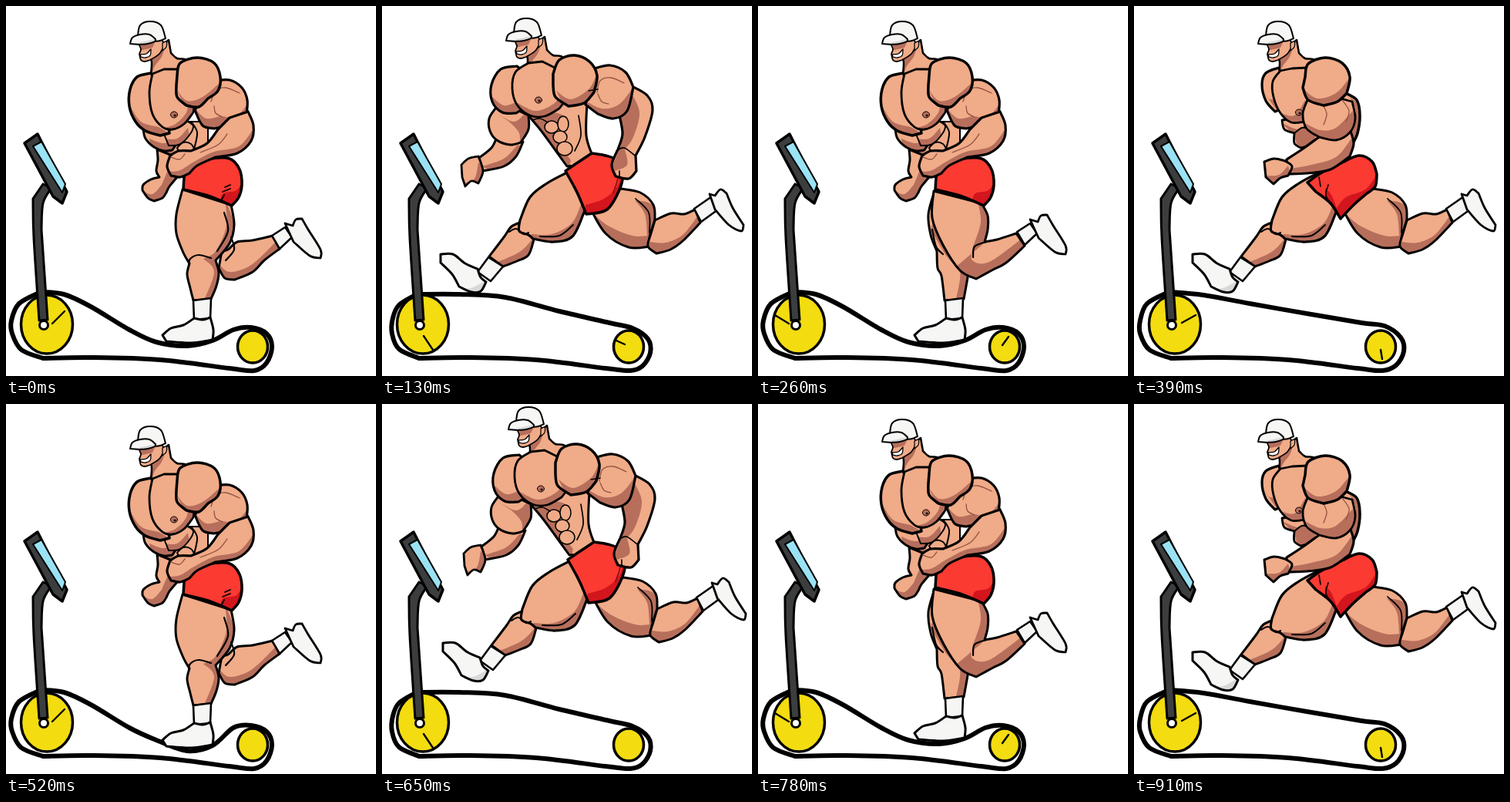
An HTML page with a canvas that plays this animation: 480 by 480 pixels, repeating every 1.04 s.

```html
<!DOCTYPE html>
<html lang="en">
<head>
<meta charset="utf-8">
<title>Treadmill runner</title>
<style>
html, body { margin: 0; width: 100%; height: 100%; overflow: hidden; background: #fff; }
canvas { display: block; }
</style>
</head>
<body>
<canvas id="stage" width="480" height="480"></canvas>
<script>
const ctx = document.getElementById('stage').getContext('2d');
const INK = '#000', SKIN = '#f0ab88', SHADE = '#b76f5c', RED = '#fb3a32', DEEP = '#d3151d',
      WHITE = '#f6f6f5', YELLOW = '#f3dc10', STEEL = '#3c3d3e', BLUE = '#9ae2f4';
const STEP = 130;
ctx.lineCap = ctx.lineJoin = 'round';

// Smooth curve through points; "/" marks a corner, ";" starts a new stroke.
const cache = new Map();
function curve(text) {
  if (cache.has(text)) return cache.get(text);
  const path = new Path2D();
  for (const stroke of text.split(';')) {
    let last = null;
    for (const run of stroke.split('/')) {
      const n = run.trim().split(/\s+/).map(Number);
      const p = last ? [last] : [];
      for (let i = 0; i < n.length; i += 2) p.push([n[i], n[i + 1]]);
      if (!last) path.moveTo(...p[0]);
      for (let i = 0; i < p.length - 1; i++) {
        const a = p[i - 1] || p[i], b = p[i], c = p[i + 1], d = p[i + 2] || c;
        path.bezierCurveTo(b[0] + (c[0] - a[0]) / 6, b[1] + (c[1] - a[1]) / 6,
                           c[0] - (d[0] - b[0]) / 6, c[1] - (d[1] - b[1]) / 6, ...c);
      }
      last = p[p.length - 1];
    }
  }
  cache.set(text, path);
  return path;
}

function line(text, width = 2, color = INK) {
  ctx.strokeStyle = color;
  ctx.lineWidth = width;
  ctx.stroke(curve(text));
}

// Filled, outlined shape with an optional shadow kept inside it.
function part(text, fill, shadow, width = 3) {
  const path = curve(text + ' / ' + text.trim().split(/\s+/).slice(0, 2).join(' '));
  ctx.fillStyle = fill;
  ctx.fill(path);
  if (shadow) {
    ctx.save();
    ctx.clip(path);
    ctx.fillStyle = fill === RED ? DEEP : fill === WHITE ? '#d9d9d9' : SHADE;
    ctx.fill(curve(shadow));
    ctx.restore();
  }
  ctx.strokeStyle = INK;
  ctx.lineWidth = width;
  if (width) ctx.stroke(path);
}

function oval(x, y, rx, ry, fill, width = 2) {
  ctx.beginPath();
  ctx.ellipse(x, y, rx, ry, 0, 0, 7);
  ctx.fillStyle = fill;
  ctx.fill();
  ctx.strokeStyle = INK;
  ctx.lineWidth = width;
  ctx.stroke();
}

function nipple(x, y) {
  oval(x, y, 4.5, 4, SHADE, 1);
  oval(x + 1, y + 1, 1.2, 1, '#7d3f35', 1);
}

function head() {
  part('187 62 / 189 74 188 88 / 205 110 240 95 / 235 71 222 68 214 61 / 211 44', SKIN,
       '185 68 / 190 88 / 193 78 202 66 206 54', 2.5);
  part('172 49 / 175 56 173 62 / 175 70 180 72 187 70 / 199 62 206 50 / 200 40', SKIN,
       '168 48 / 173 57 190 54 / 195 44', 1.8);
  part('174 63 / 182 62 188 56 / 187 64 181 67 175 66', '#fff', '', 1.3);
  part('203 48 / 208 46 208 53 203 58', SKIN, '', 1.2);
  part('171 39 / 174 25 187 20 201 25 207 42 / 200 45 192 46', WHITE, '', 2);
  part('161 49 / 164 41 174 37 186 37 194 43 / 193 46 184 49 173 50', WHITE,
       '161 50 175 47 193 43 / 193 52', 2);
}

function standTorso(marks) {
  part('200 150 / 206 185 222 212 / 232 225 / 262 208 / 262 150', SKIN, '200 150 / 212 180 228 224 / 195 220', 2);
  part('196 186 / 197 200 195 214 199 222 / 188 225 178 232 177 239 / 184 249 192 253 / 203 249 208 242 / 212 234 222 222 / 218 195',
       SKIN, '177 240 / 190 244 202 232 / 214 206 225 200 / 222 258 184 258');
  part('236 210 / 262 199 290 198 303 212 306 232 302 248 293 259 / 262 246 230 238 / 231 222', RED,
       '307 226 / 299 239 282 243 278 252 / 293 263 307 250', 3.5);
  if (marks) line('281 241 291 237; 284 235 291 232; 279 253 283 245', 1.8);
  part('178 160 / 181 172 192 183 205 188 216 187 / 226 165 200 155', SKIN, '186 172 / 204 178 222 172 / 222 195 190 195');
  part('205 166 / 216 159 232 148 / 243 156 236 170 224 180 211 181', SKIN, '205 172 / 222 172 236 158 / 238 190 205 188', 2);
  part('222 184 / 230 177 240 179 245 187 / 236 193 226 192', SKIN, '', 2);
  line('240 150 / 248 164 244 186', 2);
  part('188 87 / 170 92 161 108 160 130 168 150 181 162 200 168 / 212 165 / 205 120', SKIN,
       '160 128 / 175 150 198 157 / 215 170 165 168', 3.5);
  part('190 88 / 186 112 190 140 203 157 216 160 231 153 243 138 / 246 120 / 225 82 / 205 82', SKIN,
       '205 158 / 220 153 234 138 236 122 / 250 130 225 170', 2.8);
  nipple(218, 141);
  part('270 97 / 290 96 306 106 313 122 312 140 / 298 152 270 159 / 255 155 245 135', SKIN,
       '246 134 / 260 146 280 143 297 145 313 128 / 315 158 260 165', 3.2);
  line('266 124 / 272 110 285 106 303 113; 270 130 / 272 139 281 144', 1.3, '#925443');
  part('314 137 / 321 155 318 175 300 191 272 196 / 248 207 238 217 / 226 222 214 220 / 209 208 213 194 / 224 188 240 188 / 261 178 275 160 / 290 145',
       SKIN, '322 158 / 302 182 270 189 244 202 226 213 211 215 / 218 228 330 200', 3.2);
  line('214 196 / 225 199 232 192; 252 190 / 275 180 287 166', 1.3, '#925443');
  part('222 90 / 226 74 248 67 270 74 278 92 275 110 262 120 / 250 131 234 129 / 222 118 221 103', SKIN,
       '221 108 / 235 123 255 118 277 100 / 276 125 235 137', 3.5);
}

function standLegNear() {
  part('280 318 / 288 316 300 306 320 304 346 298 / 355 315 / 335 330 320 345 297 355 / 284 353 276 340', SKIN,
       '276 334 / 290 345 318 336 350 306 / 360 318 300 365 275 355');
  part('229 238 / 221 270 221 295 230 320 238 334 / 235 348 239 366 243 382 / 266 380 / 273 363 276 346 272 330 / 290 308 296 284 292 258', SKIN,
       '284 250 / 286 285 272 318 256 328 / 270 345 256 384 / 280 380 / 300 290');
  line('237 336 / 239 328 250 323 266 327; 283 268 / 288 292 274 318; 292 300 / 296 316 285 330', 2.2);
  sock('243 382 / 244 407 / 265 405 / 266 379');
  backFoot(0, 0);
}

function standLegFar() {
  part('229 240 / 221 270 224 297 232 318 / 233 340 238 350 242 382 / 267 380 / 272 352 275 330', SKIN,
       '224 290 / 245 325 262 345 256 384 / 285 380 285 320 230 270');
  part('228 240 / 226 275 240 310 262 343 283 354 / 305 342 322 333 346 311 / 335 295 / 310 303 294 306 / 298 290 298 272 290 256', SKIN,
       '284 250 / 289 280 279 312 / 278 330 300 332 342 302 / 352 318 285 368 255 340 / 276 322 / 297 302 302 275');
  line('279 326 / 281 312 296 306; 226 290 / 231 312 240 322', 2.2);
  sock('243 382 / 244 407 / 265 405 / 266 379');
  backFoot(-9, -5);
}

function sock(text) { part(text, WHITE, '', 2.6); }

function backFoot(dx, dy) {
  ctx.save();
  ctx.translate(dx, dy);
  sock('345 298 / 362 287 / 371 300 / 355 315');
  part('362 282 / 372 285 / 376 277 384 276 / 392 290 408 316 408 327 / 394 324 373 306', WHITE, '', 2.8);
  ctx.restore();
}

function stand(near) {
  (near ? standLegNear : standLegFar)();
  part('203 427 / 214 418 230 414 244 405 / 256 407 265 404 / 269 420 268 433 / 240 437 208 435', WHITE, '', 3);
  head();
  standTorso(near);
}

function leapLegs() {
  part('310 237 / 335 242 352 258 354 278 / 347 300 347 312 / 320 313 290 295 270 262 / 280 240', SKIN,
       '272 268 / 295 286 325 298 344 298 / 341 270 328 252 / 352 260 360 300 330 325 275 300');
  part('354 278 / 375 269 392 270 406 264 / 413 281 / 390 305 374 316 356 321 / 345 312 348 298', SKIN,
       '347 306 / 368 307 390 297 410 272 / 420 285 365 330 342 320');
  line('329 250 / 346 268 347 294', 1.8);
  sock('405 263 / 428 247 / 436 264 / 414 280');
  part('425 244 / 432 246 / 439 238 447 243 / 455 262 469 284 / 466 292 450 284 432 264', WHITE, '', 2.8);

  part('182 280 / 168 286 158 300 139 325 / 157 338 / 175 331 190 323 197 303 / 194 290', SKIN,
       '200 296 / 180 318 150 332 / 165 345 200 325');
  part('240 216 / 214 230 192 248 179 278 / 178 292 190 297 196 302 / 222 306 247 299 262 268 / 275 235', SKIN,
       '194 296 / 220 296 246 282 258 258 / 275 262 250 312 190 310', 3.2);
  line('165 293 / 174 289 184 296 190 294; 205 299 / 230 298 248 284', 2);
  sock('138 326 / 157 338 / 141 357 / 124 345');
  part('76 322 / 92 322 108 334 124 341 / 128 352 135 358 / 128 370 116 371 100 364 / 91 348 76 333', WHITE,
       '100 366 / 115 366 135 356 / 130 380', 3);
}

function leapOpen() {
  leapLegs();
  head.call(ctx.translate(0, -4));
  ctx.translate(0, 4);
  part('188 140 / 205 160 222 183 240 208 / 258 206 273 194 / 265 168 266 125 / 220 110', SKIN,
       '185 135 / 235 142 226 170 245 200 / 235 212 185 150', 3);
  part('238 214 / 254 203 272 191 / 290 194 304 200 312 216 309 236 292 264 265 270 / 255 246 248 232', RED,
       '310 205 / 306 232 288 250 264 258 / 266 278 315 255', 3.5);
  line('300 205 / 306 222 300 242', 1.8, '#8e1016');
  for (const [x, y, rx, ry] of [[220, 157, 9, 8], [235, 153, 7, 10], [231, 170, 9, 8], [237, 185, 10, 9]])
    oval(x, y, rx, ry, SKIN, 1.5);
  line('250 188 / 258 168 255 142; 215 151 / 205 146 195 148', 1.7);
  part('149 170 / 142 184 126 197 / 131 214 / 158 208 174 195 183 176', SKIN, '130 208 / 158 198 176 180 / 190 190 150 218');
  part('147 133 / 139 146 140 162 149 174 166 180 180 177 / 190 160 190 142 / 165 130', SKIN,
       '150 140 / 172 150 188 136 / 192 145 192 165 178 184 / 178 165 165 150');
  part('103 206 / 112 198 125 195 / 131 214 125 230 / 116 227 108 234 / 104 222', SKIN,
       '106 230 / 120 224 125 203 / 135 210 128 238', 2.8);
  part('175 78 / 154 82 142 102 143 124 156 138 174 139 / 188 130 / 190 90', SKIN,
       '143 118 / 158 129 174 125 / 185 145 145 145', 3.2);
  part('190 74 / 173 86 169 107 175 128 192 142 211 143 230 133 / 240 120 / 228 82 / 208 72', SKIN,
       '176 126 / 200 136 225 125 236 105 / 248 130 215 155 175 145', 2.8);
  nipple(203, 122);
  part('324 104 / 344 116 351 135 341 170 329 194 / 330 214 / 320 224 303 221 / 298 206 306 186 / 312 166 308 142', SKIN,
       '322 110 / 334 138 326 170 315 186 / 318 206 302 214 / 310 230 298 210 / 310 175 307 140', 3.2);
  line('304 188 / 314 184 328 194; 308 222 / 308 214', 1.6);
  part('272 82 / 296 77 316 86 326 105 / 318 136 300 146 280 140 / 264 128', SKIN,
       '262 122 / 285 133 307 128 324 108 / 325 145 275 150', 3.2);
  line('279 112 / 283 97 297 93 314 100; 280 114 / 285 124 294 127', 1.3, '#925443');
  part('222 88 / 230 70 250 64 269 72 279 90 275 112 / 262 126 242 130 / 225 118 222 103', SKIN,
       '226 110 / 245 121 268 108 277 92 / 282 125 240 138', 3.5);
  line('268 110 280 108', 1.4);
}

function leapBent() {
  leapLegs();
  head();
  part('225 229 / 242 217 270 203 / 292 194 309 202 315 218 / 313 234 301 244 / 285 258 268 276 / 255 256 236 241', RED,
       '314 220 / 300 238 275 248 263 262 / 256 245 248 236 / 250 256 270 282 318 240', 3.5);
  line('252 232 / 249 246 258 260; 240 222 / 242 234', 1.6);
  part('192 148 / 195 160 208 165 / 208 178 216 184 / 240 178 / 240 140 / 215 145', SKIN,
       '192 152 / 215 160 225 145 / 240 160 218 190 208 168', 2.8);
  line('208 165 / 218 158 228 160', 2);
  part('188 80 / 171 87 166 102 171 123 183 137 / 200 130', SKIN, '166 108 / 175 120 186 122 / 190 142', 3.2);
  part('190 84 / 180 98 181 118 190 139 204 151 222 150 / 240 120 / 225 80 / 205 81', SKIN,
       '188 138 / 208 142 222 122 / 235 150 200 160', 2.8);
  nipple(214, 138);
  part('272 112 / 289 122 293 142 290 165 283 180 / 260 170', SKIN, '280 118 / 288 140 276 180 / 300 180 296 130', 3.5);
  part('240 170 / 218 186 198 199 / 198 218 / 225 217 255 212 280 195 / 285 178 280 160', SKIN,
       '198 212 / 230 206 262 196 282 172 / 290 200 230 228', 3.2);
  part('169 202 / 182 198 196 201 / 205 208 200 220 / 190 223 181 231 / 171 222', SKIN,
       '172 220 / 188 219 200 207 / 205 235 178 238', 3);
  part('225 122 / 219 140 224 159 240 170 / 262 174 280 164 287 146 283 124 / 260 118', SKIN,
       '222 152 / 242 161 262 158 284 136 / 290 175 240 180', 2.8);
  line('244 126 / 250 140 246 154; 270 122 / 279 136 275 150', 1.3, '#925443');
  part('222 92 / 226 75 248 67 270 74 280 92 276 113 / 264 124 246 129 / 226 122 219 106', SKIN,
       '220 108 / 238 120 262 113 279 94 / 280 125 235 135', 3.5);
}

const BOTTOM = ' 322 473 290 470 200 459 110 456 48 457 /';
const standBelt = dip => `45 371 / 75 374 110 390 160 420 195 436 235 ${441 + dip} 268 ${434 + dip} ` +
  `295 420 318 417 338 425 345 442 338 463${BOTTOM} 20 446 8 425 7 408 17 386 45 371`;
const OPEN_BELT = `45 374 / 100 374 160 378 230 396 295 411 325 418 345 432 348 450 338 467${BOTTOM} 22 445 13 425 14 405 22 388 45 374`;
const BENT_BELT = `45 371 / 90 375 150 386 230 400 295 411 325 415 346 430 350 448 340 466${BOTTOM} 20 446 8 425 8 408 17 386 45 371`;

function machine(belt, spokes) {
  line(belt, 6);
  oval(53, 413, 33.5, 38, YELLOW, 3.5);
  oval(320, 442, 19.5, 21, YELLOW, 3.5);
  line(spokes, 2.4);
  part('48 231 / 59 236 / 48 256 46 290 / 54 407 / 43 408 / 36 300 35 250', STEEL, '', 3);
  oval(49, 414, 5.5, 5.5, '#fff', 3);
  part('24 178 / 41 166 / 79 241 / 73 256 / 61 247', STEEL, '', 3.5);
  part('35 182 / 46 176 / 77 231 / 73 242', BLUE, '', 2);
}

const UP = '60 412 76 396', DOWN = '54 428 66 446', LEFT = '22 401 40 412', RIGHT = '62 411 80 401';
const standNear = () => stand(true), standFar = () => stand(false);
const bent = [leapBent, 0, 0, BENT_BELT, RIGHT + '; 320 446 322 458'];
const far = [standFar, 0, 0, standBelt(0), LEFT + '; 317 440 325 429'];
const cycle = [
  [standNear, 0, 0, standBelt(0), UP],
  [leapOpen, 0, 0, OPEN_BELT, DOWN + '; 304 434 315 439'],
  far,
  bent,
  [standNear, 0, 9, standBelt(9), UP],
  [leapOpen, 3, -12, OPEN_BELT, DOWN],
  far,
  bent
];

function draw(now) {
  const [pose, dx, dy, belt, spokes] = cycle[Math.floor(now / STEP) % cycle.length];
  ctx.fillStyle = '#fff';
  ctx.fillRect(0, 0, 480, 480);
  machine(belt, spokes);
  ctx.save();
  ctx.translate(dx, dy);
  pose();
  ctx.restore();
  requestAnimationFrame(draw);
}
draw(0);
</script>
</body>
</html>
```
